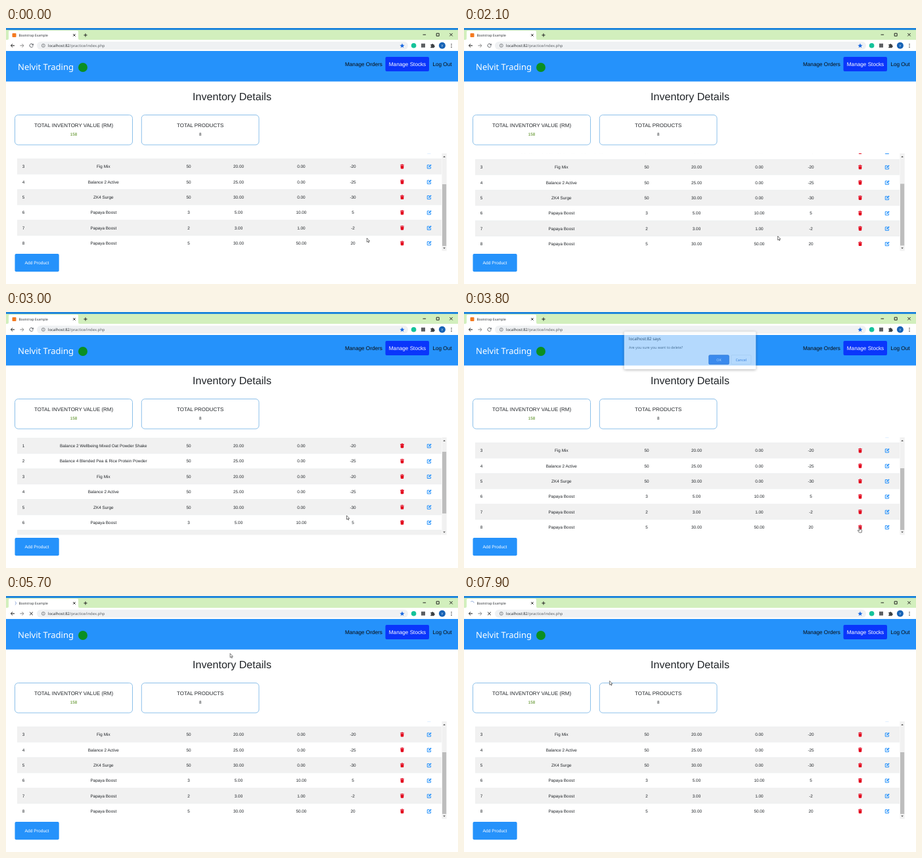
An HTML page that plays this animation: 688x390 px, repeating every 8000 ms.

```html
<!DOCTYPE html>
<html lang="en">
<head>
<meta charset="utf-8">
<title>Inventory</title>
<style>
  html, body { margin: 0; width: 100%; height: 100%; overflow: hidden; background: #fff; }
  svg { display: block; width: 688px; height: 390px; font-family: "Liberation Sans", Arial, sans-serif; fill: #212529; text-rendering: geometricPrecision; }
  .ui { font-family: "Open Sans", sans-serif; }
  .mid { text-anchor: middle; }
  .line { fill: none; stroke: #5f6368; stroke-width: 1; }
  .dark { stroke: #222; }
  .card { fill: #fff; stroke: #8cc0ea; }
  .nav { font-size: 8.2px; fill: #0b0b0b; }
  #table { font-size: 6.4px; }
</style>
</head>
<body>
<svg viewBox="0 0 688 390">
  <defs>
    <clipPath id="viewport"><rect x="17" y="191" width="646" height="148.5"/></clipPath>
    <g id="trash" fill="#e3001b">
      <path d="M-2.9-2.8h1.7l.5-.7h1.4l.5.7h1.7v.9h-5.8z"/>
      <path d="M-2.5-1.5h5l-.3 4.2q-.1.7-.8.7h-2.8q-.7 0-.8-.7z"/>
    </g>
    <g id="edit" fill="none" stroke="#2491fb" stroke-width="1">
      <path d="M.3-2.2h-3.3v5.2h5.2v-2.6"/>
      <path d="M-.9 1 2.8-2.7" stroke-width="1.7"/>
    </g>
  </defs>
  <rect width="688" height="390" fill="#fff"/>

  <!-- browser -->
  <rect width="688" height="18" fill="#d2efbd"/>
  <rect width="688" height="3" fill="#2187db"/>
  <path d="M2 18q2 0 2-2v-10q0-2 2-2h102q2 0 2 2v10q0 2 2 2z" fill="#fff"/>
  <rect y="18" width="688" height="17" fill="#fff"/>
  <rect id="favicon" x="9.5" y="8" width="6" height="6" rx="1" fill="#f47a20"/>
  <path id="spinner" d="M3 0A3 3 0 0 1-1.5 2.6" class="line" style="stroke:#7d9cd8;stroke-width:.8"/>
  <text x="19.5" y="12.9" class="ui" font-size="5">Bootstrap Example</text>
  <path class="line dark" d="M102.2 9.2l3.4 3.4m0-3.4l-3.4 3.4M118.4 10.9h5.2m-2.6-2.6v5.2M634.5 10.2h4.6M655.2 8.2h4v4h-4zM675.3 8l4.4 4.4m0-4.4l-4.4 4.4"/>
  <path class="line dark" d="M13 26.8H7.4m2.6-2.6-2.6 2.6 2.6 2.6"/>
  <path class="line" style="stroke:#888" d="M21.4 26.8H27m-2.6-2.6 2.6 2.6-2.6 2.6"/>
  <g id="reload">
    <path class="line" d="M41 25.3a2.7 2.7 0 1 0 .2 2.4"/>
    <path d="M41.8 23.6v2.8H39z" fill="#5f6368"/>
  </g>
  <path id="stop" class="line dark" d="M36.2 24.5l4.6 4.6m0-4.6l-4.6 4.6"/>
  <rect x="47" y="20.7" width="565" height="12.4" rx="6.2" fill="#eff1f3"/>
  <circle cx="56.8" cy="26.8" r="2.5" class="line" style="stroke-width:.7"/>
  <path class="line" style="stroke-width:.7" d="M56.8 26.4v1.8m0-3.2v.7"/>
  <text x="64" y="29" class="ui" font-size="5.9">localhost:82<tspan fill="#55595e">/practice/index.php</tspan></text>
  <path d="M603 23.3l1 2.4 2.6.2-2 1.7.6 2.5-2.2-1.4-2.2 1.4.6-2.5-2-1.7 2.6-.2z" fill="#1a68e0"/>
  <circle cx="620.6" cy="26.8" r="3.8" fill="#15c39a"/>
  <rect x="632" y="23.7" width="6" height="6" fill="#5c5f62"/>
  <path d="M646.3 25h1.6a1.1 1.1 0 0 1 2.2 0h1.6v1.8a1.1 1.1 0 0 1 0 2.2v1.2h-5.4v-1.6a1 1 0 0 0 0-2z" fill="#3c4043"/>
  <circle cx="663.9" cy="26.8" r="5" fill="#1763b6"/>
  <text x="663.9" y="28.8" class="ui mid" font-size="5" fill="#fff">Y</text>
  <path d="M678 24v6" stroke="#333" stroke-width="1.3" stroke-dasharray="1.2"/>

  <!-- page -->
  <rect y="35" width="688" height="46.5" fill="#2592fb"/>
  <text x="18" y="64.4" font-size="13" fill="#fff" style="font-family:'Noto Sans',sans-serif">Nelvit Trading</text>
  <circle cx="117" cy="60" r="7" fill="#0b8f22"/>
  <rect x="577.5" y="44" width="66.5" height="22" rx="2" fill="#0a36fb"/>
  <g class="nav mid">
    <text x="544.4" y="57.8">Manage Orders</text>
    <text x="611" y="57.8" fill="#fff">Manage Stocks</text>
    <text x="664" y="57.8">Log Out</text>
  </g>
  <text x="344" y="109.5" class="mid" font-size="16.1">Inventory Details</text>
  <rect class="card" x="13.5" y="132.5" width="179" height="45.5" rx="5"/>
  <rect class="card" x="206.3" y="132.5" width="178.7" height="45.5" rx="5"/>
  <g class="mid" font-size="7.95">
    <text x="103" y="151">TOTAL INVENTORY VALUE (RM)</text>
    <text x="295.7" y="151">TOTAL PRODUCTS</text>
    <text x="103" y="163.6" font-size="6.3" fill="#4d8712">158</text>
    <text x="295.7" y="163.6" font-size="6.3">8</text>
  </g>
  <g clip-path="url(#viewport)"><g id="table" class="mid"></g></g>
  <rect x="663.5" y="191" width="7.2" height="148.5" fill="#f1f1f1"/>
  <rect id="thumb" x="664" width="6.2" height="94" fill="#bdbdbd"/>
  <path d="M665.3 197l1.8-2 1.8 2zM665.3 334.5l1.8 2 1.8-2z" fill="#505050"/>
  <rect x="13.5" y="344" width="67.2" height="27.2" rx="2" fill="#2592fb"/>
  <text x="47" y="360" class="mid" font-size="6.7" fill="#fff">Add Product</text>

  <g id="dialog" class="ui">
    <rect x="243.7" y="34" width="200.6" height="57.5" rx="1.5" fill="#fff" style="filter:drop-shadow(0 1px 2px #0007)"/>
    <text x="251" y="47.8" font-size="6.2">localhost:82 says</text>
    <text x="251" y="60.7" font-size="5.4" fill="#55595e">Are you sure you want to delete?</text>
    <rect x="372.7" y="70" width="30.6" height="14" rx="1.5" fill="#4687e6" stroke="#2f66bd" stroke-width=".7"/>
    <rect x="406.6" y="70" width="30.4" height="14" rx="1.5" fill="#fff" stroke="#e1e4e8" stroke-width=".6"/>
    <g class="mid" font-size="5.4">
      <text x="388" y="79" fill="#fff">OK</text>
      <text x="421.8" y="79" fill="#3872cc">Cancel</text>
    </g>
  </g>

  <g id="cursor" fill="#fff" stroke="#222" stroke-width=".6">
    <path id="arrow" d="M0 0V6.1L1.4 4.9 2.4 7 3.3 6.6 2.4 4.6H4.3Z"/>
    <path id="hand" d="M-.6.6q.6-1.1 1.2 0v2.6l2 .4q.8.3.7 1.2l-.5 3.2h-3.6l-2.3-3.2q.4-1 1.4-.2l1.1.8z"/>
  </g>
</svg>
<script>
const $ = id => document.getElementById(id);
const LOOP = 8000, ROW = 23.35, FIRST_ROW = 164.3, SCROLL_UP = 39.5;

const products = [
  ["Balance 2 Wellbeing Mixed Oat Powder Shake", 50, 20, 0],
  ["Balance 4 Blended Pea & Rice Protein Powder", 50, 25, 0],
  ["Fig Mix", 50, 20, 0],
  ["Balance 2 Active", 50, 25, 0],
  ["ZK4 Surge", 50, 30, 0],
  ["Papaya Boost", 3, 5, 10],
  ["Papaya Boost", 2, 3, 1],
  ["Papaya Boost", 5, 30, 50]
];
const columns = [26.5, 148.3, 278, 354, 449.4, 528];

$("table").innerHTML = products.map(([name, qty, cost, price], i) => {
  const y = FIRST_ROW + i * ROW;
  const cells = [i + 1, name.replace("&", "&amp;"), qty, cost.toFixed(2), price.toFixed(2), price - cost];
  return `<rect x="17" y="${y - ROW / 2}" width="646" height="${ROW}" fill="${i % 2 ? "#fff" : "#f1f1f1"}"/>
    <path d="M17 ${y - ROW / 2}h646" stroke="#e3e6e9" stroke-width=".5"/>` +
    cells.map((cell, c) => `<text x="${columns[c]}" y="${y + 2.3}">${cell}</text>`).join("") +
    `<use href="#trash" x="603" y="${y}"/><use href="#edit" x="644.3" y="${y}"/>`;
}).join("");

// time, x, y
const path = [
  [0, 549.3, 320], [100, 549.3, 320], [500, 505, 318], [1700, 505, 318], [2100, 477.6, 317],
  [2600, 477.6, 317], [3000, 518.5, 310], [3400, 602.3, 328], [4100, 602.3, 328],
  [4900, 368.3, 82.5], [5000, 368.3, 82.5], [5250, 387, 76], [5450, 387, 76],
  [6200, 211.3, 120.3], [6800, 211.3, 120.3], [7600, 221.7, 129.3], [LOOP, 221.7, 129.3]
];

const ramp = (t, from, to) => Math.min(1, Math.max(0, (t - from) / (to - from)));
const ease = u => u * u * (3 - 2 * u);
const show = (id, on) => $(id).style.display = on ? "" : "none";
const move = (id, x, y, extra = "") => $(id).setAttribute("transform", `translate(${x} ${y})${extra}`);

function draw(t) {
  const scroll = SCROLL_UP * (ease(ramp(t, 2075, 2355)) - ease(ramp(t, 3050, 3330)));
  move("table", 0, scroll);
  $("thumb").setAttribute("y", 238 - scroll * .635);

  const opened = ramp(t, 3680, 3865), closed = ramp(t, 5420, 5520);
  show("dialog", opened > 0 && closed < 1);
  $("dialog").setAttribute("opacity", opened * (1 - closed));
  move("dialog", 0, -12.5 * (1 - opened));

  const loading = t >= 5600;
  show("favicon", !loading);
  show("reload", !loading);
  show("spinner", loading);
  show("stop", loading);
  move("spinner", 12.3, 11, ` rotate(${120 - (t - 6200) * .36})`);

  const k = path.findIndex(key => key[0] > t);
  const [t0, x0, y0] = path[k - 1], [t1, x1, y1] = path[k];
  const u = ease(ramp(t, t0, t1));
  move("cursor", x0 + (x1 - x0) * u, y0 + (y1 - y0) * u);
  const pointing = t >= 3350 && t < 4150;
  show("hand", pointing);
  show("arrow", !pointing);
}

const start = performance.now();
(function tick() {
  draw((performance.now() - start) % LOOP);
  requestAnimationFrame(tick);
})();
</script>
</body>
</html>
```
